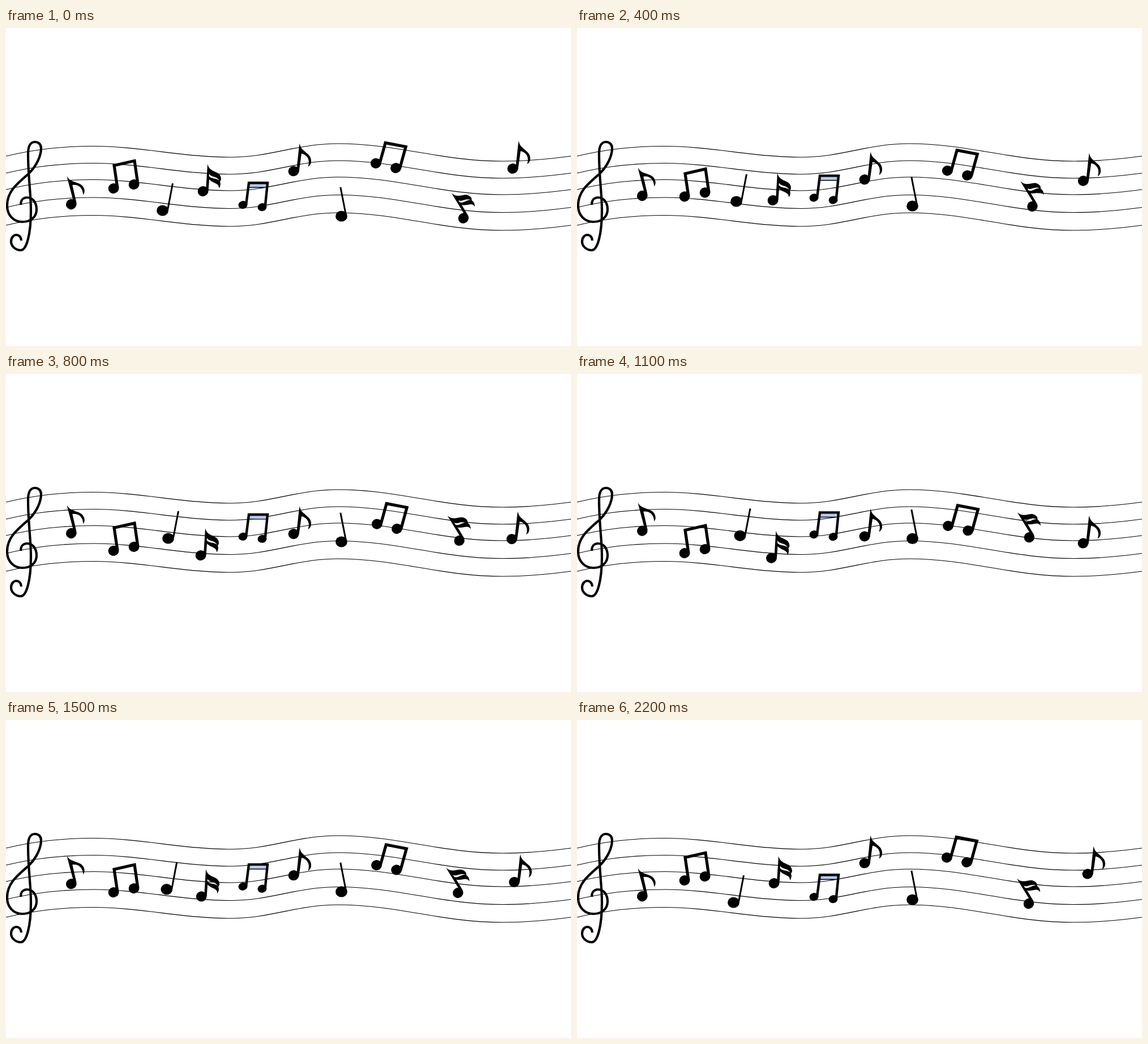
Recreate the animation shown at these times as an HTML page. Size 998 px wide and 561 px high, loop 2300 ms.

```html
<!DOCTYPE html>
<html lang="en">
<head>
<meta charset="utf-8">
<title>Dancing notes</title>
<style>
  html, body { margin: 0; width: 100%; height: 100%; overflow: hidden; background: #fff; }
  svg { display: block; width: 100%; height: 100%; }
  .stroke { fill: none; stroke: #000; }
</style>
</head>
<body>
<svg viewBox="0 0 998 561">
  <defs>
    <path id="line" class="stroke" stroke-width="1.2"
      d="M0 226C50 214 105 208.5 155 208.5C235 208.5 315 228 394 228C470 228 512 204 587 204C690 204 770 235 877 235C920 235 960 231 998 226"/>
    <ellipse id="head" rx="9.4" ry="9" transform="rotate(-10)"/>
    <ellipse id="wide" rx="10.4" ry="9.6"/>
    <ellipse id="small" rx="8" ry="7" transform="rotate(-12)"/>
    <g id="eighth">
      <use href="#head"/>
      <path d="M10.8-49C12-39 18-37 24-31C29-27 31-23 31-18C31-13 29-10 25.5-8C29-18 26-28 14-31L9.5 1L5 0L9.8-44Z"/>
    </g>
    <g id="sixteenth">
      <use href="#head"/>
      <path fill-rule="evenodd" d="M8-48C10-40 15-37 22-34C30-31 32-26 32-21L30-17C32-12 30-8 28-5C29-15 18-13 11-21L9.5 0L5-1ZM11-31C14-24 23-28 29-19C22-24 14-21 10.5-27Z"/>
    </g>
  </defs>
  <g id="staff"></g>
  <path class="stroke" stroke-width="4.2"
    d="M26 312C26 303 31 299 37 299C48 299 54 309 54 320C54 334 43 342 29 342C13 342 2 330 2 313C2 287 22 273 40 257C54 243 62 226 62 212C62 205 57 201 51 201C43 201 39 209 39 222C39 265 44 290 44 322C44 365 36 392 26 392C17 392 9 385 9 377C9 369 14 365 18 365C24 365 27 370 27 375"/>

  <!-- Offset of each note at its turning point, and at the end if it does not come home -->
  <g data-peak="0,-37.5"><use href="#eighth" transform="translate(115.3 311) rotate(-21)"/></g>
  <g data-peak="0,36">
    <use href="#head" x="190" y="283"/><use href="#head" x="226" y="276"/>
    <path class="stroke" stroke-width="5.2" d="M197 283L191 242.5L227 234.3L233 276"/>
  </g>
  <g data-peak="12.5,-40">
    <use href="#wide" x="276.5" y="322"/>
    <path class="stroke" stroke-width="3" d="M294.5 274L285.5 321"/>
  </g>
  <g data-peak="-5,40"><use href="#sixteenth" transform="translate(348 288)"/></g>
  <g data-peak="0,-31.5">
    <use href="#small" x="418.5" y="312"/><use href="#small" x="452.5" y="316"/>
    <path fill="#b4c8f0" d="M429 274H462L461 281H428Z"/>
    <path class="stroke" stroke-width="1.4" d="M428 281.3H461"/>
    <path class="stroke" stroke-width="4.4" d="M424 312L429 273.2H462L457.5 317"/>
  </g>
  <g data-peak="0,37"><use href="#eighth" transform="translate(508 252.5)"/></g>
  <g data-peak="0,-45" data-end="0,-15">
    <use href="#wide" x="592.5" y="332"/>
    <path class="stroke" stroke-width="3" d="M590.8 280.7L600.5 330"/>
  </g>
  <g data-peak="2.5,32.5" data-end="0,4">
    <use href="#head" x="653.3" y="238.7"/><use href="#head" x="688.5" y="247"/>
    <path class="stroke" stroke-width="5.2" d="M660 239L670.2 202.6L706.2 209.5L695.5 248"/>
  </g>
  <g data-peak="-9,-52" data-end="-10,-11.5"><use href="#sixteenth" transform="translate(808 335.5) rotate(-35)"/></g>
  <g data-peak="-2,54" data-end="7,23.5"><use href="#eighth" transform="translate(895 248)"/></g>
</svg>
<script>
const LOOP = 2300, STEP = 100, TURN = 1000, END = 2200;

document.getElementById('staff').innerHTML =
  [0, 30, 59, 90.5, 122].map(y => `<use href="#line" y="${y}"/>`).join('');

const vector = text => text.split(',').map(Number);
const notes = [...document.querySelectorAll('[data-peak]')].map(node => ({
  node,
  peak: vector(node.dataset.peak),
  end: vector(node.dataset.end || '0,0'),
  ease: node.dataset.end ? 1.4 : 1
}));

// Steady way out, then back; notes that stop short slow down on the way.
function offset({ peak, end, ease }, t) {
  if (t <= TURN) return peak.map(v => v * t / TURN);
  const p = 1 - ((END - t) / (END - TURN)) ** ease;
  return peak.map((v, i) => v + (end[i] - v) * p);
}

function draw(now) {
  const t = Math.floor(now % LOOP / STEP) * STEP;
  for (const note of notes)
    note.node.setAttribute('transform', `translate(${offset(note, t)})`);
  requestAnimationFrame(draw);
}
draw(0);
</script>
</body>
</html>
```
